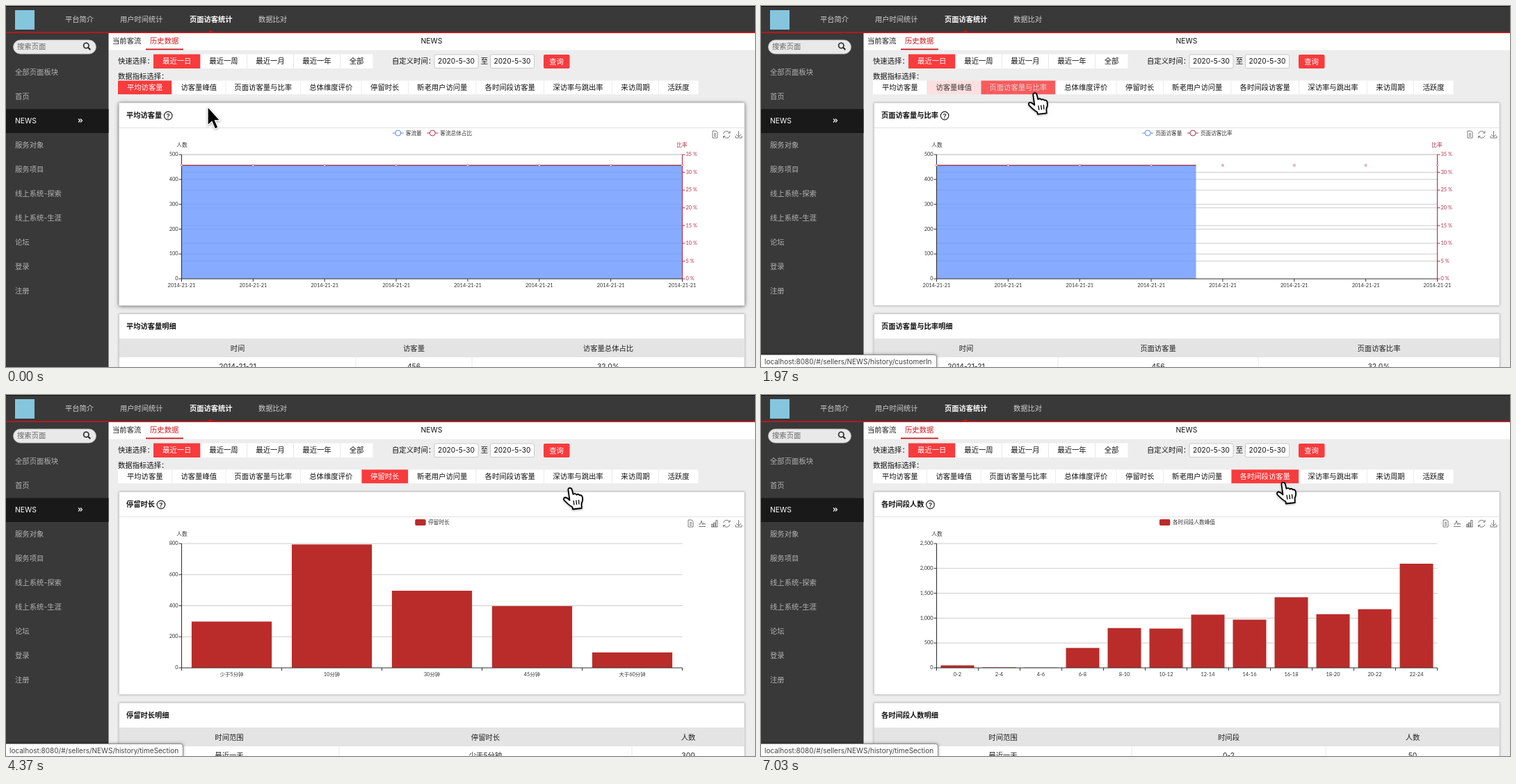
An HTML page that plays this animation: 1077 px wide and 520 px high, repeating every 7060 ms.

```html
<!DOCTYPE html>
<html lang="zh-CN">
<head>
<meta charset="utf-8">
<title>页面访客统计</title>
<style>
html, body { margin: 0; width: 100%; height: 100%; overflow: hidden; background: #ededed; }
svg { display: block; position: absolute; left: 0; top: 0; }
text { font-family: Inter, "Noto Sans CJK SC", "Noto Sans CJK", sans-serif; white-space: pre; }
.plot text { font-family: Lato, "Noto Sans CJK SC", "Noto Sans CJK", sans-serif; }
.card { filter: drop-shadow(0 .5px 1.5px rgba(0,0,0,.28)); }
.lift { filter: drop-shadow(0 1px 3px rgba(0,0,0,.45)); }
#cursor { filter: drop-shadow(0 1px 1.5px rgba(0,0,0,.35)); }
#status {
  position: absolute; left: -1px; top: 502px; height: 18px; padding: 0 6px 0 5px;
  font: 10px/18px Inter, sans-serif; color: #444; background: #fdfdfd; white-space: nowrap;
  border: 1px solid #8d8d8d; border-radius: 0 4px 0 0; box-shadow: 0 0 4px rgba(0,0,0,.4);
}
</style>
</head>
<body>
<svg id="stage" width="1077" height="520" viewBox="0 0 1077 520"></svg>
<div id="status"></div>
<script>
const LOOP = 7060, RED = '#f83b3d', BAR = '#b92c2a', ROSE = '#b52f48', BLUE = '#6996ff';
const L = 252.5, R = 972.5, T = 214, B = 393, W = R - L, H = B - T;
const stage = document.getElementById('stage');
const status = document.getElementById('status');

function el(parent, tag, attrs = {}) {
  const n = document.createElementNS('http://www.w3.org/2000/svg', tag);
  for (const k in attrs) n.setAttribute(k, attrs[k]);
  parent.appendChild(n);
  return n;
}
const rect = (p, x, y, width, height, fill, more) => el(p, 'rect', { x, y, width, height, fill, ...more });
const line = (p, x1, y1, x2, y2, stroke, w = 1) =>
  el(p, 'line', { x1, y1, x2, y2, stroke, 'stroke-width': w });
const path = (p, d, stroke, w = 1, fill = 'none', more) =>
  el(p, 'path', { d, stroke, 'stroke-width': w, fill, ...more });
const ring = (p, cx, cy, r, stroke, w = 1, fill = '#fff') =>
  el(p, 'circle', { cx, cy, r, stroke, 'stroke-width': w, fill });

// x is the anchor point, y the vertical middle of the glyphs
function label(p, x, y, s, fill = '#111', anchor = 'start', size = 10.35, weight = 400) {
  const n = el(p, 'text', { x, y: y + size * .37, fill, 'text-anchor': anchor, 'font-size': size, 'font-weight': weight });
  n.textContent = s;
  return n;
}
const small = (p, x, y, s, anchor = 'middle', fill = '#333') => label(p, x, y, s, fill, anchor, 7.4);

function drawFrame(g) {
  rect(g, 0, 0, 1077, 520, '#ededed');
  rect(g, 147, 39, 930, 24.5, '#fff');
  rect(g, 0, 0, 1077, 39, '#393939');
  rect(g, 0, 0, 1077, 1, '#111');
  rect(g, 0, 39, 147.5, 481, '#393939');
  rect(g, 0, 37.4, 1077, 1.7, '#c4171b');
  path(g, 'M290 38 L294 34.5 L298 38Z', 'none', 0, '#c4171b');
  rect(g, 13, 6, 28, 28, '#86c5de');
  [[85, '平台简介'], [164, '用户时间统计'], [264, '页面访客统计'], [363, '数据比对']].forEach(([x, s], i) =>
    label(g, x, 19.5, s, i === 2 ? '#fff' : '#d0d0d0', 'start', 10.25, i === 2 ? 700 : 400));

  rect(g, 10.5, 49, 119, 20, '#e9e9e9', { rx: 10, stroke: '#bbb', 'stroke-width': .8 });
  label(g, 16, 58.5, '搜索页面', '#666');
  ring(g, 115.3, 57, 3.7, '#222', 1.6, 'none');
  line(g, 118, 59.8, 121.3, 63, '#222', 2);
  rect(g, 0, 148.5, 147.5, 34.5, '#191919');
  ['全部页面板块', '首页', 'NEWS', '服务对象', '服务项目', '线上系统-探索', '线上系统-生涯', '论坛', '登录', '注册']
    .forEach((s, i) => label(g, 13, 95.5 + i * 35, s, i === 2 ? '#fff' : '#b3b3b3'));
  path(g, 'M104 162.5l2.5 2.5l-2.5 2.5M107 162.5l2.5 2.5l-2.5 2.5', '#fff', 1.1);

  label(g, 153, 50.5, '当前客流', '#222');
  label(g, 207, 50.5, '历史数据', '#d0181c');
  rect(g, 201, 61.5, 54, 1.8, '#c4171b');
  label(g, 612, 50.5, 'NEWS', '#111', 'middle');

  label(g, 161, 79.5, '快速选择：');
  const edges = [212, 279.5, 346.5, 413.5, 480.5, 527.5];
  ['最近一日', '最近一周', '最近一月', '最近一年', '全部'].forEach((s, i) => {
    const x = edges[i], w = edges[i + 1] - x;
    rect(g, x, 69.5, w, 20.5, i ? '#fff' : RED);
    if (i > 1) line(g, x, 69.5, x, 90, '#e8e8e8');
    label(g, x + w / 2, 79.5, s, i ? '#111' : '#fff', 'middle');
  });
  label(g, 555, 79.5, '自定义时间：');
  [616, 696.5].forEach(x => {
    rect(g, x, 70, 63, 19.5, '#fff', { rx: 2, stroke: '#c9c9c9', 'stroke-width': 1 });
    label(g, x + 31.5, 79.7, '2020-5-30', '#111', 'middle', 10.1);
  });
  label(g, 688, 79.5, '至', '#111', 'middle');
  rect(g, 773, 70, 37.5, 20, RED, { rx: 2 });
  label(g, 791.5, 80, '查询', '#fff', 'middle');
  label(g, 161, 101.5, '数据指标选择：');
}

function drawTabs(g) {
  const edges = [161, 238.5, 316, 423.5, 511, 578.5, 676, 773.5, 871.5, 938.5, 995.5];
  const names = ['平均访客量', '访客量峰值', '页面访客量与比率', '总体维度评价', '停留时长',
    '新老用户访问量', '各时间段访客量', '深访率与跳出率', '来访周期', '活跃度'];
  return names.map((s, i) => {
    const x = edges[i], w = edges[i + 1] - x;
    const box = rect(g, x, 107.5, w, 19.7, '#fff');
    if (i) line(g, x, 107.5, x, 127.2, '#ececec');
    return { box, text: label(g, x + w / 2, 117.3, s, '#111', 'middle') };
  });
}

function drawTable(g, title, cuts, heads, row) {
  label(g, 173, 461.5, title, '#111', 'start', 10.25, 700);
  rect(g, 163, 479, 899, 27, '#e4e4e4');
  const e = [163, ...cuts, 1062];
  heads.forEach((s, i) => {
    const x = (e[i] + e[i + 1]) / 2;
    if (i) line(g, e[i], 506, e[i], 520, '#e8e8e8');
    label(g, x, 493, s, '#222', 'middle');
    label(g, x, 519, row[i], '#222', 'middle');
  });
}

function drawTitle(g, s) {
  label(g, 173, 157.5, s, '#111', 'start', 10.25, 700);
  const x = 181.7 + s.length * 10.3;
  ring(g, x, 158, 5.8, '#222', 1.2);
  label(g, x, 158.2, '?', '#222', 'middle', 9.5, 600);
}

function drawTools(g, full) {
  const c = '#777';
  const page = x => path(g, `M${x - 3.5} 180h5l2 2v8h-7zM${x - 1.5} 183.5h3M${x - 1.5} 185.5h3M${x - 1.5} 187.5h3`, c);
  page(full ? 984.5 : 1019.5);
  if (full) {
    path(g, 'M996 186h2.5l1.5-5l2 6l1.5-3l.8 2h2M996 189.5h10', c);
    path(g, 'M1014 190h9.5M1014.5 190v-4h2v4M1017.5 190v-6h2v6M1020.8 190v-9.5h2.2v9.5', c);
  }
  path(g, 'M1031.5 184a5 5 0 0 1 9-1.5M1041 180v3h-3M1041 186.5a5 5 0 0 1-9 1.5M1031.5 190.5v-3h3', c);
  path(g, 'M1053.5 180v8M1050 185l3.5 3.5l3.5-3.5M1049 187v3h9v-3', c);
}

function drawLegend(g, items, asBar) {
  const width = s => 19 + s.length * 7.65;
  let x = 613 - (items.reduce((a, s) => a + width(s), 0) + 7.5 * (items.length - 1)) / 2;
  items.forEach((s, i) => {
    const c = i ? ROSE : '#5b86e0';
    if (asBar) rect(g, x, 179, 15.5, 9, BAR, { rx: 2 });
    else {
      line(g, x, 183, x + 16, 183, c);
      ring(g, x + 8, 183, 4, c);
    }
    label(g, x + 19, 183, s, '#333', 'start', 7.65);
    x += width(s) + 7.5;
  });
}

function drawLeftAxis(g, max, step) {
  for (let v = 0; v <= max; v += step) {
    const y = B - v / max * H;
    if (v) line(g, L, y, R, y, '#ccc');
    line(g, L - 4, y, L, y, '#333');
    small(g, 247.5, y - .5, v.toLocaleString('en-US'), 'end');
  }
  label(g, 253, 200.5, '人数', '#333', 'middle', 7.65);
}
const drawAxisLines = g => path(g, `M${L} ${T}V${B}H${R}`, '#333', 1.1);

// Two flat series wiped in from the left
function lineChart(g, id, series, marks) {
  drawLegend(g, series);
  drawTools(g);
  for (let v = 5; v <= 35; v += 5) line(g, L, B - v / 35 * H, R, B - v / 35 * H, '#ccc');
  drawLeftAxis(g, 500, 100);
  const clip = rect(el(el(g, 'defs'), 'clipPath', { id }), L, T - 5, W, H + 10, '#000');
  const data = el(g, 'g', { 'clip-path': `url(#${id})` });
  const y = B - 456 / 500 * H;
  rect(data, L, y, W, B - y, BLUE, { opacity: .8 });
  line(data, L, y + .3, R, y + .3, BLUE, 1.4);
  line(data, L, y - .4, R, y - .4, '#a53450', 1.4);
  drawAxisLines(g);
  line(g, R, T, R, B, ROSE, 1.1);
  for (let v = 0; v <= 35; v += 5) {
    const ty = B - v / 35 * H;
    line(g, R, ty, R + 4, ty, ROSE);
    small(g, 977.5, ty - .5, v + ' %', 'start', ROSE);
  }
  label(g, 972, 200.5, '比率', ROSE, 'middle', 7.65);
  marks.forEach((s, i) => {
    const x = L + W * i / (marks.length - 1);
    line(g, x, B, x, B + 4, '#333');
    ring(g, x, y - .3, marks.length > 8 ? 1 : 1.4, '#b0586c', .8);
    small(g, x, 402, s);
  });
  return p => clip.setAttribute('width', W * (1 - (1 - p) ** 3));
}

function barChart(g, name, max, step, data) {
  drawLegend(g, [name], true);
  drawTools(g, true);
  drawLeftAxis(g, max, step);
  const band = W / data.length;
  const bars = data.map(([s, v], i) => {
    const x = L + band * i;
    line(g, x + band, B, x + band, B + 4, '#333');
    small(g, x + band / 2, 402, s);
    return [rect(g, x + band * .1, B, band * .8, 0, BAR), v / max * H];
  });
  line(g, L, B, L, B + 4, '#333');
  drawAxisLines(g);
  return p => bars.forEach(([bar, h]) => {
    h *= 1 - (1 - p) ** 4;
    bar.setAttribute('y', B - h);
    bar.setAttribute('height', h);
  });
}

function radarChart(g) {
  const cx = 613, cy = 303.5, r = 96.5, values = [.64, .5, .6, .55, .65];
  const point = (i, k) => {
    const a = -Math.PI / 2 - i * Math.PI * 2 / 5;
    return [cx + Math.cos(a) * r * k, cy + Math.sin(a) * r * k];
  };
  const outline = f => 'M' + values.map((v, i) => point(i, f(v)).join(' ')).join('L') + 'Z';
  for (let n = 5; n; n--) path(g, outline(() => n / 5), '#ccc', 1, n % 2 ? '#fbfbfb' : '#eaeaea');
  values.forEach((v, i) => line(g, cx, cy, ...point(i, 1), '#ccc'));
  [[613, 194, '访问量'], [500.5, 271, '新用户'], [539, 389, '老用户'], [686, 389, '深访量'], [724.5, 271, '活跃度']]
    .forEach(([x, y, s]) => label(g, x, y, s, '#aaa', 'middle', 7.65));
  ring(g, 594, 183.5, 4.5, '#c23531');
  label(g, 605, 183.7, '整体分析', '#333', 'start', 7.65);
  const shape = path(g, '', '#c23531', 1.3);
  const dots = values.map(() => ring(g, cx, cy, 1.5, '#c23531'));
  return p => {
    const k = 1 - (1 - p) ** 4;
    shape.setAttribute('d', outline(v => v * k));
    dots.forEach((d, i) => {
      const [x, y] = point(i, values[i] * k);
      d.setAttribute('cx', x);
      d.setAttribute('cy', y);
    });
  };
}

const days = Array(8).fill('2014-21-21');
const hours = ['21:21:21', ...Array(14).fill('08:29:32')];
const loads = [50, 10, 5, 400, 800, 790, 1070, 970, 1420, 1080, 1180, 2095];
const stays = [['少于5分钟', 300], ['10分钟', 800], ['30分钟', 500], ['45分钟', 400], ['大于60分钟', 100]];

// tab: index in the tab row; click: tab fade begins; show: chart appears
const pages = [
  { tab: 0, click: -5000, show: -5000, title: '平均访客量', cuts: [503, 670],
    heads: ['时间', '访客量', '访客量总体占比'], row: ['2014-21-21', '456', '32.0%'],
    draw: g => lineChart(g, 'wipe0', ['客流量', '客流总体占比'], days) },
  { tab: 1, click: 1000, show: 1027, title: '客流量峰值', cuts: [427, 715],
    heads: ['时间', '客流量峰值', '客流总体占比'], row: ['21:21:21', '456', '32.0%'],
    draw: g => lineChart(g, 'wipe1', ['客流量峰值', '客流总体占比'], hours) },
  { tab: 2, click: 1720, show: 1755, title: '页面访客量与比率', cuts: [427, 715],
    heads: ['时间', '页面访客量', '页面访客比率'], row: ['2014-21-21', '456', '32.0%'],
    draw: g => lineChart(g, 'wipe2', ['页面访客量', '页面访客比率'], days) },
  { tab: 3, click: 2652, show: 2692, title: '总体维度评价', cuts: [447, 661],
    heads: ['时间范围', '指标', '评价(百分制)'], row: ['开店以来', '访问量', '64.0'], draw: radarChart },
  { tab: 4, click: 3640, show: 3662, title: '停留时长', cuts: [479, 900],
    heads: ['时间范围', '停留时长', '人数'], row: ['最近一天', '少于5分钟', '300'],
    draw: g => barChart(g, '停留时长', 800, 200, stays) },
  { tab: 7, click: 4880, show: 4915, title: '深访率与跳出率', cuts: [427, 715],
    heads: ['时间', '深访率', '跳出率'], row: ['2014-21-21', '32.0%', '32.0%'],
    draw: g => lineChart(g, 'wipe3', ['深访率', '跳出率'], days) },
  { tab: 6, click: 5435, show: 5499, title: '各时间段人数', cuts: [533, 812],
    heads: ['时间范围', '时间段', '人数'], row: ['最近一天', '0-2', '50'],
    draw: g => barChart(g, '各时间段人数峰值', 2500, 500, loads.map((v, i) => [`${i * 2}-${i * 2 + 2}`, v])) },
];

drawFrame(stage);
const tabs = drawTabs(stage);
const cardStyle = { stroke: '#d2d2d2', 'stroke-width': 1, rx: 1 };
const lift = rect(stage, 162.5, 139.5, 899.5, 292, '#fff', { class: 'lift' });
rect(stage, 162.5, 139.5, 899.5, 292, '#fff', { class: 'card', ...cardStyle });
line(stage, 163, 175.5, 1062, 175.5, '#e2e2e2');
rect(stage, 162.5, 443.5, 899.5, 100, '#fff', { class: 'card', ...cardStyle });

for (const p of pages) {
  p.node = el(stage, 'g');
  drawTitle(p.node, p.title);
  drawTable(p.node, p.title + '明细', p.cuts, p.heads, p.row);
  p.update = p.draw(el(p.node, 'g', { class: 'plot' }));
}

const cursor = el(stage, 'g', { id: 'cursor' });
const arrow = path(cursor, 'M0 0V27L6 21.5L10.5 32L15 30L10.5 20H18Z', '#fff', 1.3, '#000');
const hand = el(cursor, 'g');
path(hand, 'M-2.5 3.5Q-3 .5 0 .5Q2.2 .5 3 3.5L4.5 9.5Q7.5 7.5 9.3 10.2Q12 8.5 13.7 11Q16.5 10 17.6 13' +
  'Q19 18 16.5 23L16.8 29.5L4 31L3.5 28Q-2 25-8.5 18Q-10 14.5-6.5 14Q-4 14.5-.5 18Z',
  '#000', 1.8, '#fff', { 'stroke-linejoin': 'round' });
path(hand, 'M5 18.5l1 6.5M8.8 18l.8 6.5M12.5 17.5l.5 6.5', '#000', 1.3);

// time, x, y of the pointer tip
const track = [[0, 290, 145], [60, 290, 144], [600, 284, 123], [1060, 285, 123], [1370, 396.5, 127.5],
  [1600, 392, 124], [2050, 394, 125], [2480, 499, 132.5], [2850, 499, 132.5], [3480, 569, 126.5],
  [3820, 569, 126.5], [4370, 811, 133.5], [4700, 816, 126], [4960, 816, 126], [5380, 751, 125.5], [LOOP, 751, 125.5]];
const hints = [[600, 'customerTop'], [1180, 'customerIn'], [2400, 'radar'], [3350, 'stayBar'], [4050, 'timeSection']];

const clamp = v => Math.max(0, Math.min(1, v));
const mix = (a, b, k) => `rgb(${a.map((v, i) => Math.round(v + (b[i] - v) * k))})`;

function pointerAt(t) {
  const i = Math.max(1, track.findIndex(k => k[0] > t));
  const [t0, x0, y0] = track[i - 1], [t1, x1, y1] = track[i];
  const u = clamp((t - t0) / (t1 - t0)), k = u * u * (3 - 2 * u);
  return [x0 + (x1 - x0) * k, y0 + (y1 - y0) * k];
}

function render(t) {
  const current = pages.filter(p => p.show <= t).pop();
  for (const p of pages) p.node.style.display = p === current ? '' : 'none';
  current.update(clamp((t - current.show) / 1000));

  const fade = pages.map(p => clamp((t - p.click) / 300));
  tabs.forEach(({ box, text }, n) => {
    const i = pages.findIndex(p => p.tab === n);
    const k = i < 0 ? 0 : fade[i] * (1 - (fade[i + 1] || 0));
    box.setAttribute('fill', mix([255, 255, 255], [248, 59, 61], k));
    text.setAttribute('fill', mix([17, 17, 17], [255, 255, 255], k));
  });

  const [x, y] = pointerAt(t);
  const onTab = t > 60 && y < 134 && t > 330;
  cursor.setAttribute('transform', `translate(${x} ${y})`);
  arrow.style.display = onTab ? 'none' : '';
  hand.style.display = onTab ? '' : 'none';
  lift.style.opacity = 1 - clamp((t - 200) / 300);

  const hint = hints.filter(h => h[0] <= t).pop();
  status.style.opacity = clamp((t - 600) / 250);
  if (hint) {
    const url = 'localhost:8080/#/sellers/NEWS/history/' + hint[1];
    if (status.textContent !== url) status.textContent = url;
  }
}

const start = performance.now();
function tick() {
  render((performance.now() - start) % LOOP);
  requestAnimationFrame(tick);
}
tick();
</script>
</body>
</html>
```
